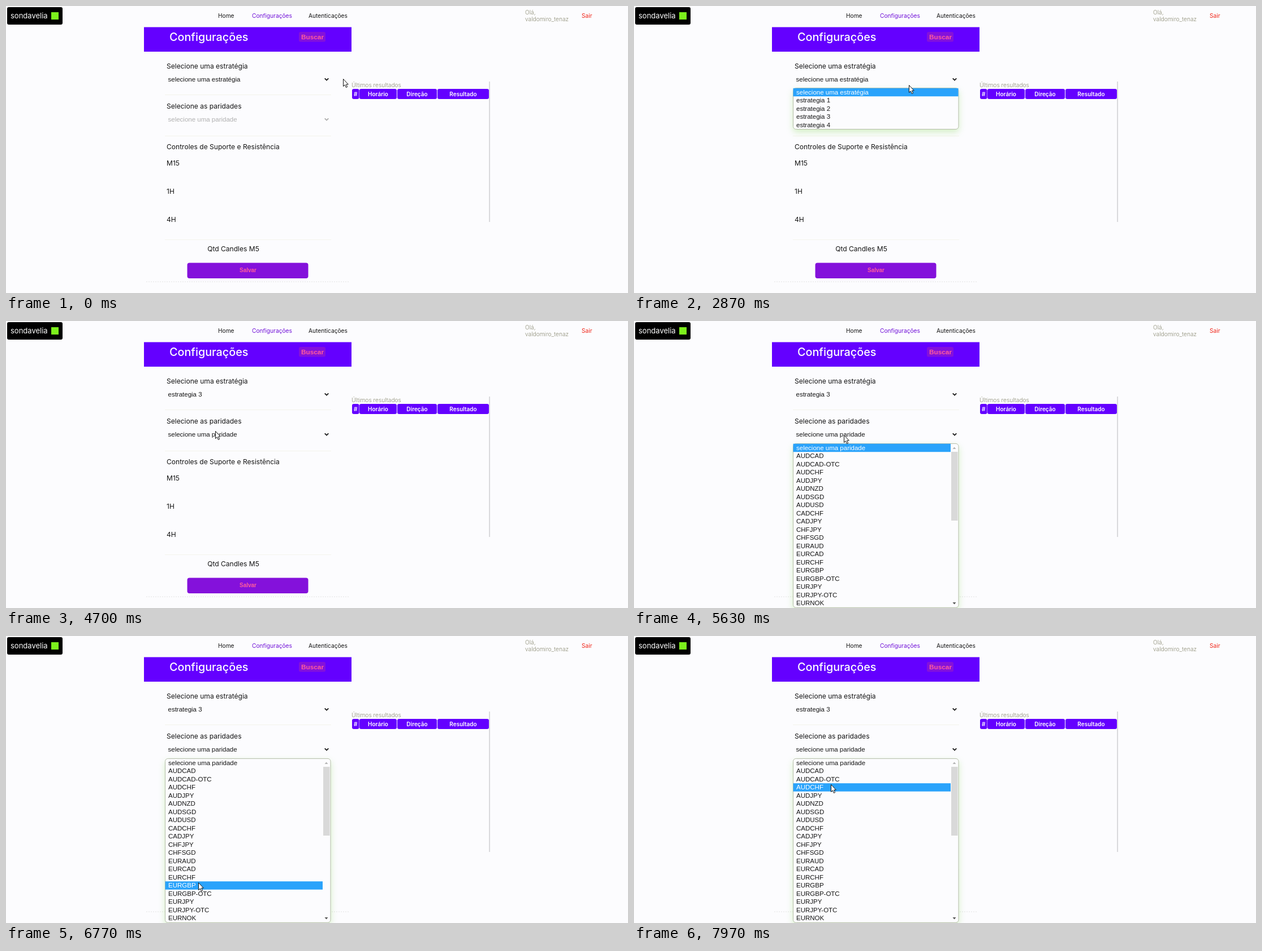
Animation of 1100 by 509 pixels, one loop 8000 ms. Source, as an HTML page:

```html
<!DOCTYPE html>
<html lang="pt-BR">
<head>
<meta charset="utf-8">
<title>Configurações</title>
<style>
html, body { margin: 0; width: 100%; height: 100%; overflow: hidden; background: #fcfcfe; }
svg { display: block; width: 1100px; height: 509px; }
text { font-family: Inter, "Open Sans", sans-serif; fill: #151515; white-space: pre; }
.label { font-size: 12.05px; }
.nav { font-size: 10.2px; }
.thin { font-size: 10.2px; font-weight: 300; fill: #8c8c74; }
.title { font-size: 19.8px; font-weight: 500; fill: #fff; }
.th { font-size: 10px; font-weight: 600; fill: #fff; text-anchor: middle; }
.field { font: 11.5px "Liberation Sans", Arial, sans-serif; }
.button { font: bold 11.8px "Liberation Sans", Arial, sans-serif; fill: #ff5c9c; text-anchor: middle; }
.list { fill: #fcfcfe; stroke: #b4bda8; filter: drop-shadow(0 5px 6px rgba(130, 215, 80, .32)); }
</style>
</head>
<body>
<svg id="stage" viewBox="0 0 1100 509"></svg>
<script>
const LOOP = 8000;
const stage = document.getElementById('stage');

function add(parent, tag, attrs, content) {
  const node = document.createElementNS('http://www.w3.org/2000/svg', tag);
  for (const key in attrs) node.setAttribute(key, attrs[key]);
  if (content) node.textContent = content;
  return parent.appendChild(node);
}
const text = (x, y, cls, content, attrs, parent = stage) =>
  add(parent, 'text', { x, y, class: cls, ...attrs }, content);
const box = (x, y, width, height, fill, rx = 0, parent = stage) =>
  add(parent, 'rect', { x, y, width, height, fill, rx });
const rule = (y, x1, x2, stroke, dash = 'none') =>
  add(stage, 'path', { d: `M${x1} ${y}H${x2}`, stroke, 'stroke-dasharray': dash });
const chevron = y =>
  add(stage, 'path', { d: `M563.7 ${y - 1.7}l3.3 3.3 3.3-3.3`, fill: 'none', 'stroke-width': 1.7 });

// Top bar
box(2, 2, 98, 31, '#000', 3);
text(8, 22, 'nav', 'sondavelia', { style: 'fill:#fff;font-size:13px' });
box(80, 11, 13, 13, '#7cf01c');
text(375, 21, 'nav', 'Home');
text(435, 21, 'nav', 'Configurações', { style: 'fill:#7010d8' });
text(535, 21, 'nav', 'Autenticações');
text(918, 15, 'thin', 'Olá,');
text(918, 27, 'thin', 'valdomiro_tenaz');
text(1018, 21, 'nav', 'Sair', { style: 'fill:#f02418' });

// Settings panel
box(244, 37.5, 367, 43.5, '#6400ff');
text(289, 62, 'title', 'Configurações');
box(518, 46, 47, 17.5, '#8411db', 3);
text(542, 59, 'button', 'Buscar');
[
  [111, 'Selecione uma estratégia'], [182, 'Selecione as paridades'],
  [254, 'Controles de Suporte e Resistência'],
  [283, 'M15'], [333, '1H'], [382.5, '4H']
].forEach(([y, content]) => text(284, y, 'label', content));
[157.5, 230.5, 414.5].forEach(y => rule(y, 281, 575, '#f4f4ec'));
rule(489, 248, 607, '#e2e2e2', '2 2');
text(402, 435, 'label', 'Qtd Candles M5', { 'text-anchor': 'middle' });
box(320.5, 455.5, 214, 27.5, '#8411db', 4);
text(428, 472, 'button', 'Salvar', { style: 'font-size:10px' });

const strategy = text(286.5, 134, 'field');
const pair = text(286.5, 205, 'field', 'selecione uma paridade');
chevron(130).setAttribute('stroke', '#111');
const pairArrow = chevron(201);

// Results table
text(611, 144, 'thin', 'Últimos resultados');
[[612, 12.5, '#'], [625, 66, 'Horário'], [692, 70, 'Direção'], [763, 91, 'Resultado']]
  .forEach(([x, w, content]) => {
    box(x, 147, w, 18, '#6400ff', 3);
    text(x + w / 2, 160, 'th', content);
  });
box(854.5, 134, 1.2, 249, '#c2c2c6');

// Option lists
function dropdown(top, bottom, pitch, width, options) {
  const group = add(stage, 'g', {});
  add(group, 'rect', { x: 281.5, y: top - .3, width: 292.5, height: bottom - top, rx: 5, class: 'list' });
  const mark = box(281.5, top, width, pitch, '#2aa3fb', 0, group);
  const rows = options.map((name, i) =>
    text(287, top + pitch * i + 11.2, 'field', name, {}, group));
  return {
    group,
    show(open, y) {
      group.style.display = open ? '' : 'none';
      const active = Math.max(0, Math.min(rows.length - 1, Math.floor((y - top) / pitch)));
      mark.setAttribute('y', top + pitch * active);
      rows.forEach((row, i) => row.style.fill = i === active ? '#fff' : '');
    }
  };
}

const strategies = dropdown(145.8, 218.8, 14.45, 292,
  ['selecione uma estratégia', ...[1, 2, 3, 4].map(n => 'estrategia ' + n)]);
const pairs = dropdown(217.7, 508.6, 14.5, 278.5, ['selecione uma paridade',
  ...('AUDCAD AUDCAD-OTC AUDCHF AUDJPY AUDNZD AUDSGD AUDUSD CADCHF CADJPY CHFJPY CHFSGD ' +
  'EURAUD EURCAD EURCHF EURGBP EURGBP-OTC EURJPY EURJPY-OTC EURNOK').split(' ')]);
box(561, 232, 11.5, 122, '#d9d9d9', 0, pairs.group);
add(pairs.group, 'path', { d: 'M563.5 227l3-3.5 3 3.5z', fill: '#b5b5b5' });
add(pairs.group, 'path', { d: 'M563.5 499l3 3.5 3-3.5z', fill: '#555' });

const pointer = add(stage, 'path', {
  d: 'M.5.5V13.5L3.4 10.8 5.4 15.5 7.6 14.5 5.6 10H9.3z',
  fill: '#fff', stroke: '#111', 'stroke-linejoin': 'round'
});

// Pointer path: time, x, y
const path = [
  [0, 596, 129], [30, 596, 129], [830, 525, 128], [870, 525, 128], [1130, 515, 131],
  [2770, 515, 131], [3170, 400, 165], [3370, 400, 165], [3570, 378, 188],
  [3800, 374, 206], [4030, 370, 195], [5000, 370, 195], [5270, 371, 202],
  [6170, 371, 202], [6300, 372, 328], [6770, 340, 437], [6970, 339, 447],
  [7470, 345, 330], [7800, 345, 330], [7970, 348, 263], [LOOP, 348, 263]
];

function pointerAt(t) {
  const i = path.findIndex(key => key[0] > t);
  const [t0, x0, y0] = path[i - 1], [t1, x1, y1] = path[i];
  const k = (t - t0) / (t1 - t0);
  return [x0 + (x1 - x0) * k, y0 + (y1 - y0) * k].map(Math.round);
}

function draw(now) {
  const t = now % LOOP;
  const [x, y] = pointerAt(t);
  const chosen = t >= 4700;
  strategy.textContent = chosen ? 'estrategia 3' : 'selecione uma estratégia';
  pair.style.fill = chosen ? '' : '#b0b0b0';
  pairArrow.setAttribute('stroke', chosen ? '#111' : '#aaa');
  strategies.show(t >= 2770 && !chosen, y);
  pairs.show(t >= 5630, y);
  pointer.setAttribute('transform', `translate(${x} ${y})`);
}

const start = performance.now();
function tick() {
  draw(performance.now() - start);
  requestAnimationFrame(tick);
}
tick();
</script>
</body>
</html>
```
